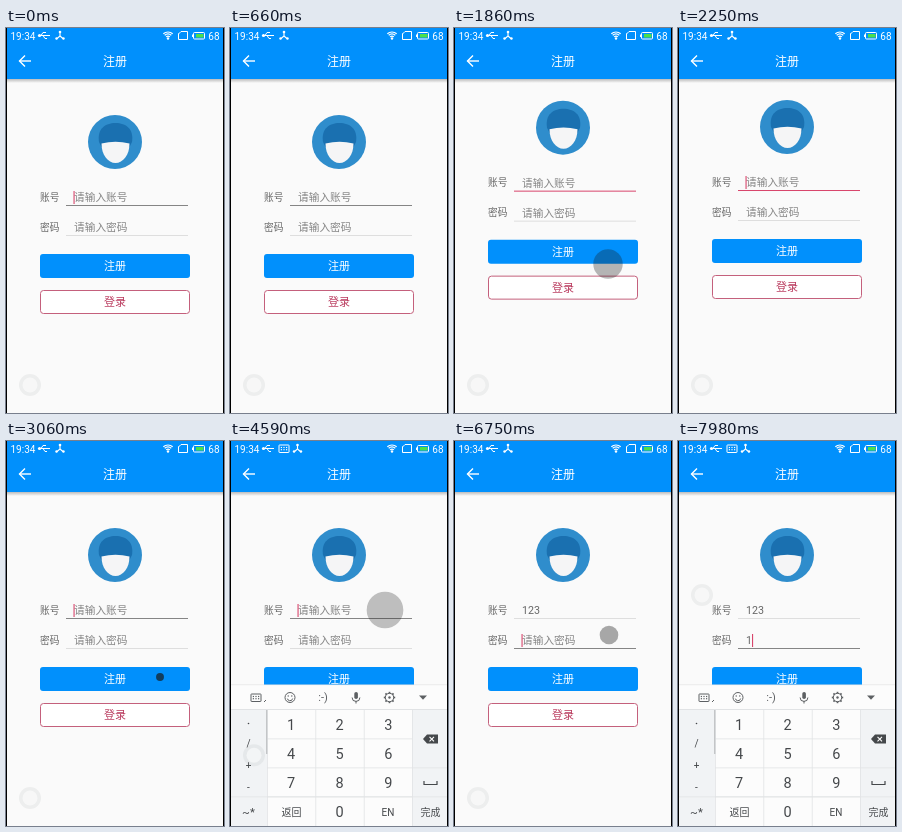
An HTML page with a canvas for the animation above (8 s loop, 218x385 px).

```html
<!DOCTYPE html>
<html lang="zh-CN">
<head>
<meta charset="utf-8">
<title>注册</title>
<style>
html, body { margin: 0; width: 100%; height: 100%; overflow: hidden; background: #fafafa; }
canvas { display: block; width: 218px; height: 385px; }
</style>
</head>
<body>
<canvas id="stage"></canvas>
<script>
const W = 218, H = 385, LOOP = 8000;
const BLUE = '#0190fc', PINK = '#d8466c', TITLE = '#fff';
const canvas = document.getElementById('stage');
const dpr = window.devicePixelRatio || 1;
canvas.width = W * dpr;
canvas.height = H * dpr;
const c = canvas.getContext('2d');

const clamp = v => Math.max(0, Math.min(1, v));
const span = (t, a, b) => clamp((t - a) / (b - a));
const smooth = p => (1 - Math.cos(Math.PI * p)) / 2;
const within = (t, a, b) => t >= a && t < b;

function text(s, x, y, size, color, align = 'center') {
  c.font = `${size}px Roboto, "Noto Sans CJK SC", "Noto Sans CJK", sans-serif`;
  c.textAlign = align;
  c.textBaseline = 'alphabetic';
  c.fillStyle = color;
  c.fillText(s, x, y);
}
function box(x, y, w, h, color) {
  c.fillStyle = color;
  c.fillRect(x, y, w, h);
}
function disc(x, y, r, color) {
  c.fillStyle = color;
  c.beginPath();
  c.arc(x, y, r, 0, 7);
  c.fill();
}
function line(color, width, ...pts) {
  c.strokeStyle = color;
  c.lineWidth = width;
  c.beginPath();
  for (let i = 0; i < pts.length; i += 2) c.lineTo(pts[i], pts[i + 1]);
  c.stroke();
}
function ring(x, y, r, color, width, a = 0, b = 7) {
  c.strokeStyle = color;
  c.lineWidth = width;
  c.beginPath();
  c.arc(x, y, r, a, b);
  c.stroke();
}
function round(x, y, w, h, r, fill, stroke) {
  c.beginPath();
  c.roundRect(x, y, w, h, r);
  if (fill) { c.fillStyle = fill; c.fill(); }
  if (stroke) { c.strokeStyle = stroke; c.lineWidth = 1; c.stroke(); }
}

// Timeline
const taps = [[1470, 154, 236], [3030, 154, 236], [4080, 155, 169], [6540, 155, 194]];
const keys = [
  { at: 5040, col: 0 }, { at: 5370, col: 1 }, { at: 5580, col: 2 }, { at: 7800, col: 0 }
];
const SHAKE = 1600, CYCLE = 371, SHAKE_END = SHAKE + 3 * CYCLE;
const shaking = t => within(t, SHAKE, SHAKE_END);
const shift = t => shaking(t) ? 15 * Math.sin((t - SHAKE) / CYCLE * 2 * Math.PI) : 0;
const keyboardUp = t =>
  smooth(span(t, 4300, 4500)) - smooth(span(t, 5760, 5960)) + smooth(span(t, 6800, 7000));
const ballUp = t =>
  smooth(span(t, 4500, 4800)) - smooth(span(t, 5800, 6100)) + smooth(span(t, 6880, 7180));
const keyboardIcon = t => within(t, 4300, 5800) || t >= 6800;

function cursorOn(t) {
  if (t < 4200) return Math.floor((t + 100) / 500) % 2 === 0;
  return !within(t, 7440, 7830);
}

function drawBar(t) {
  const shade = c.createLinearGradient(0, 51, 0, 55);
  shade.addColorStop(0, 'rgba(0,0,0,.25)');
  shade.addColorStop(1, 'rgba(0,0,0,0)');
  box(0, 51, W, 4, shade);
  box(0, 0, W, 51, BLUE);
  text('注册', 109, 37.5, 12, TITLE);
  line('#fff', 1.4, 25, 33, 13.5, 33);
  line('#fff', 1.4, 19, 27.5, 13.5, 33, 19, 38.5);

  text('19:34', 4.5, 11.5, 10, '#fff', 'left');
  line('#fff', 1, 32, 7.5, 44, 7.5);
  disc(33.5, 7.5, 1.6, '#fff');
  line('#fff', 1, 35, 7.5, 37, 4.5, 40, 4.5);
  line('#fff', 1, 37, 7.5, 39, 10.5, 41, 10.5);
  const on = keyboardIcon(t);
  if (on) drawKeyIcon(54, 7.5, '#fff');
  const x = on ? 67.5 : 54;
  line('#fff', 1.1, x, 3.5, x, 8, x - 3.5, 11);
  line('#fff', 1.1, x, 8, x + 3.5, 11);
  disc(x, 4, 1.3, '#fff');
  disc(x - 3.5, 10.5, 1.2, '#fff');
  disc(x + 3.5, 10.5, 1.2, '#fff');

  for (const r of [2.8, 5, 7]) ring(162, 11, r, '#fff', 1.2, -2.3, -0.84);
  disc(162, 10.5, 1.2, '#fff');
  line('#fff', 1, 172.5, 6, 175, 3.5, 181.5, 3.5, 181.5, 11.5, 172.5, 11.5, 172.5, 5.5);
  round(187.5, 4.5, 11, 6.5, 1, null, '#fff');
  box(186, 6.5, 1.5, 2.5, '#fff');
  box(190, 6, 7.5, 3.5, '#4be04b');
  text('68', 213.5, 11.5, 10, '#fff', 'right');
}

function drawAvatar() {
  disc(109, 114, 27, '#2f8dcc');
  c.fillStyle = '#1a70b0';
  c.beginPath();
  c.moveTo(93, 114);
  c.bezierCurveTo(91, 101, 99, 95, 109.5, 95);
  c.bezierCurveTo(120, 95, 128, 101, 126, 114);
  c.lineTo(123, 120);
  c.lineTo(96, 120);
  c.fill();
  c.fillStyle = '#f5f5f6';
  c.beginPath();
  c.moveTo(95.5, 115.5);
  c.quadraticCurveTo(109.5, 112, 123.5, 115.5);
  c.bezierCurveTo(123.5, 127, 117, 135, 109.5, 135);
  c.bezierCurveTo(102, 135, 95.5, 127, 95.5, 115.5);
  c.fill();
}

function drawField(y, label, hint, value, focus, color, caret) {
  text(label, 34, y + 3.5, 9.7, '#666', 'left');
  text(value || hint, 68, y + 4, 10.7, value ? '#666' : '#858585', 'left');
  box(60, y + 8, 122, 1, focus ? color : '#dedede');
  if (focus && caret) box(value ? 68 + c.measureText(value).width : 67.5, y - 6, 1.1, 13, PINK);
}

function drawForm(t) {
  const typed = keys.filter(k => t >= k.at + 30).length;
  const second = t >= 6680;
  c.save();
  c.translate(0, shift(t));
  drawAvatar();
  drawField(169, '账号', '请输入账号', '123'.slice(0, typed), !second,
    shaking(t) ? PINK : '#858585', cursorOn(t));
  drawField(199, '密码', '请输入密码', typed > 3 ? '1' : '', second, '#858585', cursorOn(t));
  round(34, 226, 150, 24, 3, BLUE);
  text('注册', 109, 242, 11, '#fff');
  round(34.5, 262.5, 149, 23, 3, '#fff', '#c4607c');
  text('登录', 109, 278, 11, '#b9385c');
  c.restore();
}

function drawKeyIcon(x, y, color) {
  round(x - 5, y - 3.5, 10, 7.5, 0.5, null, color);
  for (let i = -1; i < 2; i++) {
    box(x + i * 2.6 - 0.6, y - 1.6, 1.2, 1.2, color);
    box(x + i * 2.6 - 0.6, y + 0.6, 1.2, 1.2, color);
  }
}

function drawTools() {
  const ink = '#5d6063';
  drawKeyIcon(26, 256.5, ink);
  line(ink, 1, 34, 261, 36, 259);
  ring(60, 256.5, 5, ink, 1);
  ring(60, 257, 2.7, ink, 1, 0.2, 2.9);
  disc(58.2, 255, 0.7, ink);
  disc(61.8, 255, 0.7, ink);
  text(':-)', 93, 260, 11, ink);
  round(124.3, 251, 3.6, 7, 1.8, ink);
  ring(126, 256.5, 3.9, ink, 1, 0, Math.PI);
  line(ink, 1, 126, 260, 126, 262.5);
  for (let i = 0; i < 8; i++) {
    const a = i * Math.PI / 4, x = Math.cos(a), y = Math.sin(a);
    line(ink, 1.7, 159.5 + x * 4, 256.5 + y * 4, 159.5 + x * 5.7, 256.5 + y * 5.7);
  }
  ring(159.5, 256.5, 4.2, ink, 1);
  disc(159.5, 256.5, 1.2, ink);
  c.fillStyle = ink;
  c.beginPath();
  c.moveTo(189, 254.5);
  c.lineTo(197, 254.5);
  c.lineTo(193, 258.8);
  c.fill();
}

function drawKeyboard(t) {
  const up = keyboardUp(t);
  if (up <= 0) return;
  const ink = '#45484b', edge = '#e1e3e5';
  c.save();
  c.translate(0, (1 - up) * 141);
  box(0, 244, W, 141, '#fcfcfc');
  box(0, 243.5, W, 0.7, '#e4e4e4');
  drawTools();
  box(0, 268.5, 37, 117, '#f1f3f5');
  box(182, 268.5, 36, 117, '#f1f3f5');
  for (const k of keys)
    if (within(t, k.at, k.at + 120)) box(37 + k.col * 48.5, 269, 48.5, 29, '#e0e2e4');
  box(0, 268, W, 1, edge);
  for (let i = 1; i < 4; i++) box(37, 268.5 + i * 29, 145, 0.8, edge);
  box(0, 355.5, W, 0.8, edge);
  box(182, 326.5, 36, 0.8, edge);
  for (let i = 0; i < 4; i++) box(37 + i * 48.4, 268.5, 0.8, 117, edge);
  box(36, 269, 1.4, 44, '#c3c5c7');

  for (let i = 0; i < 9; i++)
    text(i + 1, 61 + (i % 3) * 48.6, 289 + Math.floor(i / 3) * 29, 14.5, ink);
  text('0', 109.6, 376, 14.5, ink);
  text('返回', 61.5, 374.5, 10, ink);
  text('EN', 158, 374.5, 10, ink);
  text('完成', 200.5, 374.5, 10, ink);
  disc(18.5, 282.5, 0.8, ink);
  text('/', 18.5, 306, 10, ink);
  text('+', 18.5, 327.5, 10, ink);
  text('-', 18.5, 350, 10, ink);
  text('~*', 18.5, 375, 11.5, ink);

  c.fillStyle = ink;
  c.beginPath();
  c.moveTo(193, 298);
  c.lineTo(197, 293.5);
  c.lineTo(208, 293.5);
  c.lineTo(208, 302.5);
  c.lineTo(197, 302.5);
  c.fill();
  line('#fff', 1.1, 199.5, 295.8, 204, 300.3);
  line('#fff', 1.1, 204, 295.8, 199.5, 300.3);
  line(ink, 1.2, 194, 340, 194, 343.5, 207, 343.5, 207, 340);
  c.restore();
}

function drawBall(t) {
  const y = 357 - 203 * ballUp(t);
  disc(24, y, 11, 'rgba(150,155,160,.12)');
  disc(24, y, 7.5, 'rgba(255,255,255,.55)');
}

function drawTaps(t) {
  for (const [at, x, y] of taps) {
    const age = t - at;
    if (age < 0 || age > 660) continue;
    const alpha = 0.75 - 0.38 * span(age, 0, 210) - 0.1 * span(age, 210, 510)
      - 0.27 * span(age, 510, 660);
    disc(x, y, 3 + age * 0.03, `rgba(25,25,25,${alpha})`);
  }
}

function draw(t) {
  c.setTransform(dpr, 0, 0, dpr, 0, 0);
  box(0, 0, W, H, '#fafafa');
  drawForm(t);
  drawBar(t);
  drawKeyboard(t);
  drawBall(t);
  drawTaps(t);
  box(0, 0, 1, H, '#000');
  box(W - 1, 0, 1, H, '#000');
}

const start = performance.now();
function tick(now) {
  draw(Math.max(0, now - start) % LOOP);
  requestAnimationFrame(tick);
}
draw(0);
requestAnimationFrame(tick);
</script>
</body>
</html>
```
